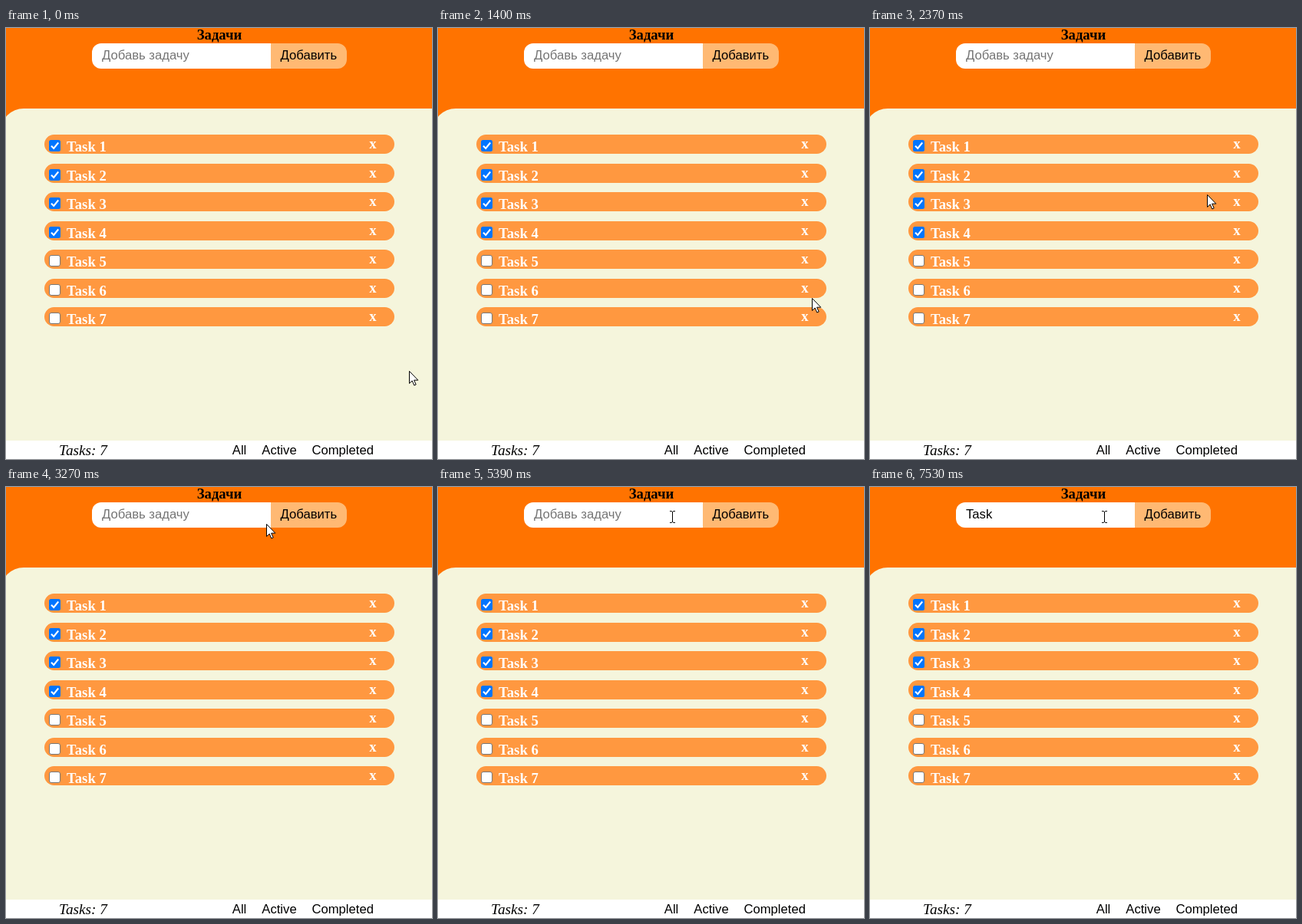
These frames come from a looping animation (555 px wide and 562 px high, 8 s). An HTML page:

```html
<!DOCTYPE html>
<html lang="ru">
<head>
<meta charset="utf-8">
<title>Задачи</title>
<style>
html, body { margin: 0; width: 100%; height: 100%; overflow: hidden; background: #fff; }
svg { display: block; }
text { font: 16.67px "Liberation Sans", Arial, sans-serif; white-space: pre; }
.bold { font: bold 18.72px "Liberation Serif", "Times New Roman", serif; }
.count { font: italic 19.2px "Liberation Serif", "Times New Roman", serif; }
</style>
</head>
<body>
<svg width="555" height="562" viewBox="0 0 555 562">
  <rect width="555" height="538" fill="#ff7300"/>
  <path d="M-7 538V135a30 30 0 0 1 30-30H555V538z" fill="#f5f5dc"/>
  <text class="bold" x="278" y="15" text-anchor="middle">Задачи</text>
  <path d="M345 20H124a12 12 0 0 0-12 12v9a12 12 0 0 0 12 12H345z" fill="#fff"/>
  <path d="M345 20h87a12 12 0 0 1 12 12v9a12 12 0 0 1-12 12h-87z" fill="#ffb973"/>
  <text x="357.5" y="41">Добавить</text>
  <text id="hint" x="125" y="41" fill="#757575">Добавь задачу</text>
  <text id="typed" x="125" y="41"></text>
  <rect id="caret" y="27" width="1" height="18"/>
  <g id="list"></g>
  <text class="count" x="69" y="557">Tasks: 7</text>
  <text x="294.8" y="556">All</text>
  <text x="333.3" y="556">Active</text>
  <text x="398.4" y="556">Completed</text>
  <path id="arrow" d="M.5.5V16.5L4.2 13 6.8 19 9.2 18 6.6 12.2H11.8z" fill="#fff" stroke="#000" stroke-linejoin="round"/>
  <path id="beam" d="M-3-7.5H-1L.5-6.5 2-7.5H4M.5-6.5V6.5M-3 7.5H-1L.5 6.5 2 7.5H4" fill="none" stroke="#000"/>
</svg>
<script>
const LOOP = 8000;
const $ = id => document.getElementById(id);

const box = '<rect x="56.5" y="7.5" width="14" height="14" rx="2.5" fill="#fff" stroke="#767676"/>';
const checkedBox = '<rect x="56" y="7" width="15" height="15" rx="2.5" fill="#0075ff"/>' +
  '<path d="M59 14.7l3.2 3.2 6-7.4" fill="none" stroke="#fff" stroke-width="2.1"/>';

$('list').innerHTML = Array.from({ length: 7 }, (_, i) => `
  <g transform="translate(0 ${Math.round(139 + 37.5 * i)})">
    <rect x="50" width="456" height="25" rx="12.5" fill="#ff9840"/>
    ${i < 4 ? checkedBox : box}
    <text class="bold" x="79" y="22" fill="#fff">Task ${i + 1}</text>
    <text class="bold" x="473.3" y="18" fill="#fff">x</text>
  </g>`).join('');

// Pointer stops: time, x, y
const path = [
  [500, 525, 447], [1040, 495, 379], [1300, 487, 352], [1400, 487, 352],
  [1660, 479, 324], [2130, 455, 245], [2230, 455, 245], [3030, 365, 85],
  [3270, 339, 48], [3430, 322, 34], [3590, 322, 34], [3830, 302, 27],
  [4120, 304, 36], [4390, 304, 36], [4510, 305, 39]
];
const keyTimes = [6080, 6330, 6530, 6870];
const caretSpans = [[3890, 4390], [4910, 5390], [5900, 7380]];

function pointerAt(t) {
  const next = path.findIndex(p => p[0] > t);
  if (next <= 0) return path.at(next).slice(1);
  const [t0, x0, y0] = path[next - 1], [t1, x1, y1] = path[next];
  const k = (t - t0) / (t1 - t0);
  return [x0 + (x1 - x0) * k, y0 + (y1 - y0) * k].map(Math.round);
}

function draw(now) {
  const t = now % LOOP;
  const inField = t >= 3310;
  const place = `translate(${pointerAt(t)})`;
  $('arrow').setAttribute('transform', place);
  $('beam').setAttribute('transform', place);
  $('arrow').style.display = inField ? 'none' : '';
  $('beam').style.display = inField ? '' : 'none';

  const typed = $('typed');
  typed.textContent = 'Task'.slice(0, keyTimes.filter(k => t >= k).length);
  $('hint').style.display = typed.textContent ? 'none' : '';
  const width = typed.textContent ? typed.getComputedTextLength() : 0;
  $('caret').setAttribute('x', Math.round(125 + width));
  $('caret').style.display = caretSpans.some(([a, b]) => t >= a && t < b) ? '' : 'none';
  requestAnimationFrame(draw);
}
draw(performance.now());
</script>
</body>
</html>
```
